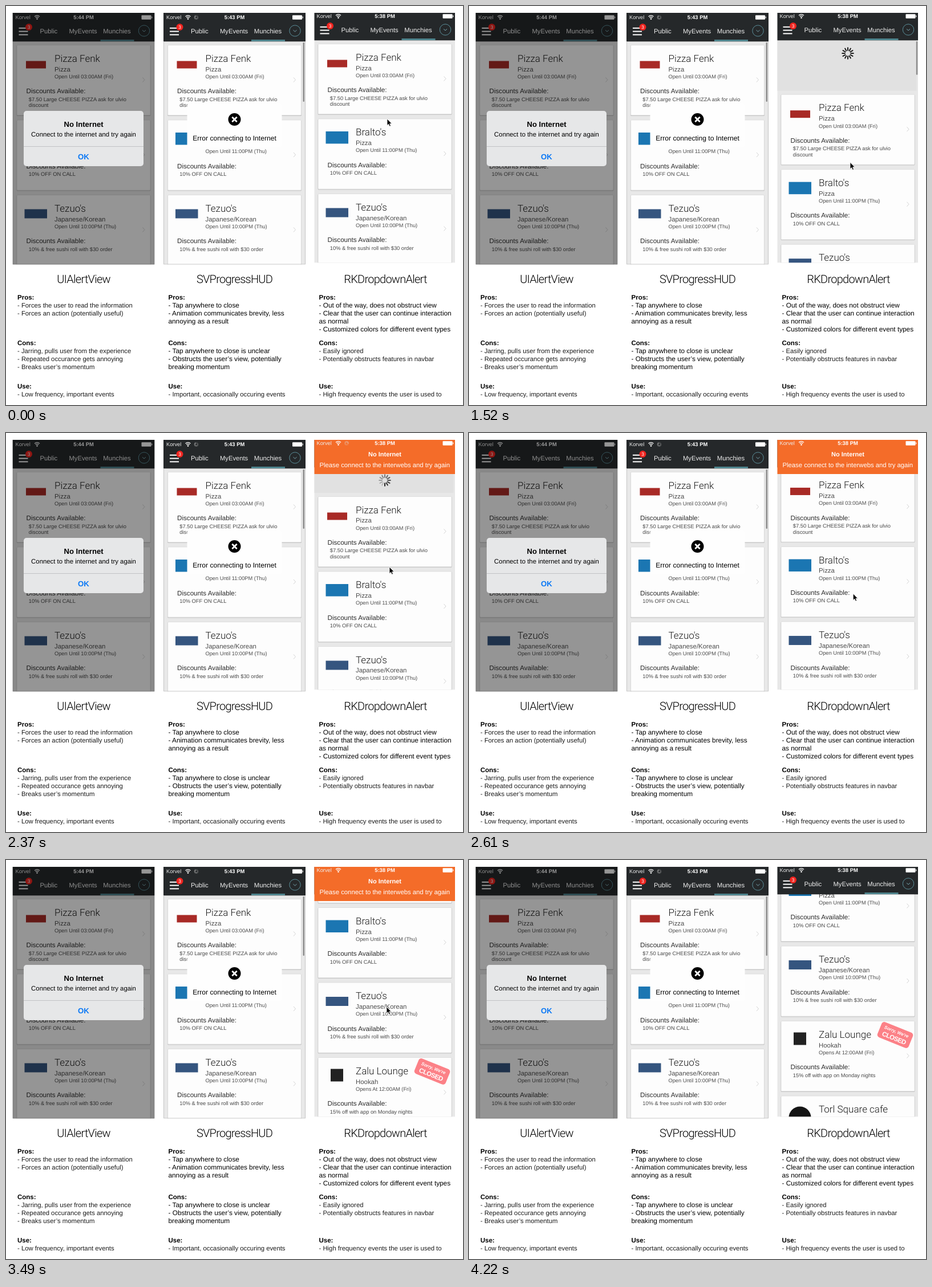
These frames come from a looping animation (801 by 700 pixels, 4580 ms). An HTML page:

```html
<!DOCTYPE html>
<html lang="en">
<head>
<meta charset="utf-8">
<title>Alert styles compared</title>
<style>
html, body { margin: 0; width: 100%; height: 100%; overflow: hidden; background: #fff; }
svg { display: block; width: 801px; height: 700px; }
text { font-family: "Liberation Sans", Arial, sans-serif; text-rendering: geometricPrecision; white-space: pre; }
.light { font-family: Roboto, "Liberation Sans", sans-serif; font-weight: 300; }
.bold { font-weight: 700; }
.mid { text-anchor: middle; }
.head { letter-spacing: -.75px; }
.tight { letter-spacing: -.6px; }
</style>
</head>
<body>
<svg id="stage" viewBox="0 0 801 700"></svg>
<script>
const LOOP = 4580, PITCH = 131.5;

const text = (x, y, size, fill, str, cls = '') =>
  `<text x="${x}" y="${y}" font-size="${size}" fill="${fill}" class="${cls}">${str}</text>`;
const rect = (x, y, w, h, fill, extra = '') =>
  `<rect x="${x}" y="${y}" width="${w}" height="${h}" fill="${fill}" ${extra}/>`;
const line = (d, stroke, w = 1) =>
  `<path d="${d}" fill="none" stroke="${stroke}" stroke-width="${w}"/>`;

const spokes = (x, y, r1, r2, w, color, id) => {
  let s = '';
  for (let i = 0; i < 12; i++)
    s += `<path d="M0 ${-r1}V${-r2}" transform="rotate(${i * 30})" opacity="${(.3 + i * .05).toFixed(2)}"/>`;
  return `<g id="${id}" transform="translate(${x} ${y})" stroke="${color}" stroke-width="${w}" stroke-linecap="round">${s}</g>`;
};

const stamp = `<g transform="translate(207.5 24.5) rotate(22)">
  ${rect(-29.5, -14.5, 59, 29, '#fc8187', 'rx="5"')}
  <g font-style="italic">${text(0, -3.5, 7.8, '#fff', "Sorry, We're", 'mid bold')}</g>
  ${text(0, 9.6, 11.4, '#fff', 'CLOSED', 'mid bold tight')}</g>`;

const cards = [
  { name: 'Pizza Fenk', kind: 'Pizza', hours: 'Open Until 03:00AM (Fri)',
    deal: ['$7.50 Large CHEESE PIZZA ask for ulvio', 'discount'],
    logo: rect(23.5, 28, 35, 13, '#a82a26') },
  { name: "Bralto's", kind: 'Pizza', hours: 'Open Until 11:00PM (Thu)',
    deal: ['10% OFF ON CALL'], logo: rect(21, 22, 39.5, 21.5, '#1b76b2') },
  { name: "Tezuo's", kind: 'Japanese/Korean', hours: 'Open Until 10:00PM (Thu)',
    deal: ['10% &amp; free sushi roll with $30 order'], logo: rect(21, 25, 39.5, 16, '#35557f') },
  { name: 'Zalu Lounge', kind: 'Hookah', hours: 'Opens At 12:00AM (Fri)',
    deal: ['15% off with app on Monday nights'], logo: rect(29.5, 20, 22, 22, '#222'), extra: stamp },
  { name: 'Torl Square cafe', kind: '', hours: '', deal: [],
    logo: '<circle cx="40.5" cy="38" r="19.5" fill="#151515"/>' }
];

const card = (c, i) => `<g transform="translate(0 ${56.5 + i * PITCH})">
  ${rect(7, .8, 235, 123.6, '#c6c6c6', 'rx="1.5"')}
  ${rect(7.5, 0, 234, 123.2, '#fdfdfd', 'rx="1.5" stroke="#d6d6d6" stroke-width=".7"')}
  ${c.logo}
  ${text(73.5, 29.2, 17, '#1a1a1a', c.name, 'light')}
  ${text(73.5, 46, 11.4, '#4c4c4c', c.kind)}
  ${text(73.5, 58.4, 9.27, '#4c4c4c', c.hours)}
  ${text(24, 84.6, 11.65, '#2c2c2c', 'Discounts Available:')}
  ${c.deal.map((d, k) => text(28.3, 98 + k * 10.8, 9.3, '#484848', d)).join('')}
  ${line('M228 57l3.5 4-3.5 4', '#d4d4d4')}
  ${c.extra || ''}</g>`;

const status = (time, busy) => `
  ${text(5, 11.2, 9.3, '#eee', 'Korvel')}
  ${line('M38.5 6.6q4.5-3.8 9 0M40.2 8.6q2.8-2.4 5.6 0', '#fff', 1.3)}
  <circle cx="43" cy="10.6" r="1.3" fill="#fff"/>
  ${busy ? spokes(57.5, 8, 2, 3.6, .8, '#ddd', busy) : ''}
  ${text(124.5, 11.3, 9.4, '#fff', time, 'mid bold')}
  ${rect(226, 4.2, 17, 7.6, '#fff', 'rx="1"')}${rect(243.6, 6.5, 1.2, 3, '#fff')}`;

const nav = `${rect(0, 50, 249, 1, '#000', 'opacity=".25"')}${rect(0, 0, 249, 50, '#25282a')}
  ${[25.8, 31.6, 37.4].map(y => rect(11, y, 16, 2, '#fff')).join('')}
  <circle cx="28.5" cy="25" r="6" fill="#f0241f"/>${text(28.5, 28, 8.3, '#fff', '3', 'mid')}
  ${text(48, 36, 11.3, '#eee', 'Public')}${text(99, 36, 11.2, '#eee', 'MyEvents')}
  ${text(158.8, 36, 11.3, '#eee', 'Munchies')}
  ${rect(154, 47, 59, 3, '#4f858e')}
  <circle cx="230.5" cy="31.5" r="9.7" fill="none" stroke="#5b8f9a"/>
  ${line('M227.5 30.3l3 2.7 3-2.7', '#79a9b3')}`;

const phone = (x, y, clip, body) => `<g transform="translate(${x} ${y})"><g clip-path="url(#${clip})">
  ${rect(0, 0, 249, 442, '#e8e8e8')}${body}</g></g>`;
const list = n => cards.slice(0, n).map(card).join('');
const edge = line('M.5 50V441H248.5V50', '#bdbdbd', .8);

const notes = [
  { x: 20, head: 'UIAlertView', mid: 136, parts: [
    ['Pros', 511, 1, 'Forces the user to read the information', 'Forces an action (potentially useful)'],
    ['Cons', 591, 1, 'Jarring, pulls user from the experience', 'Repeated occurance gets annoying', 'Breaks user’s momentum'],
    ['Use', 667, 1, 'Low frequency, important events']] },
  { x: 284.5, head: 'SVProgressHUD', mid: 400.5, parts: [
    ['Pros', 511, 0, 'Tap anywhere to close', 'Animation communicates brevity, less', '|annoying as a result'],
    ['Cons', 591, 0, 'Tap anywhere to close is unclear', 'Obstructs the user’s view, potentially', '|breaking momentum'],
    ['Use', 667, 1, 'Important, occasionally occuring events']] },
  { x: 548.5, head: 'RKDropdownAlert', mid: 665, parts: [
    ['Pros', 511, 0, 'Out of the way, does not obstruct view', 'Clear that the user can continue interaction', '|as normal', 'Customized colors for different event types'],
    ['Cons', 591, 1, 'Easily ignored', 'Potentially obstructs features in navbar'],
    ['Use', 667, 1, 'High frequency events the user is used to']] }
];

const column = c => text(c.mid, 485.5, 20, '#000', c.head, 'mid light head') +
  c.parts.map(([label, y, thin, ...rows]) =>
    text(c.x, y + 4, 11.5, '#000', label + ':', 'bold') +
    rows.map((r, i) => text(c.x, y + 18 + i * 14, thin ? 11.32 : 11.8, thin ? '#1c1c1c' : '#000',
      r[0] === '|' ? r.slice(1) : '- ' + r)).join('')).join('');

const modal = `${rect(31, 184, 210, 97, '#e6e7e8', 'rx="5"')}
  ${text(136, 211.5, 13.1, '#000', 'No Internet', 'mid bold')}
  ${text(136, 229, 11.37, '#000', 'Connect to the internet and try again', 'mid')}
  ${rect(31, 246, 210, .8, '#b9bbbd')}
  ${text(136, 268.7, 13.2, '#0a78f5', 'OK', 'mid bold')}`;

const hud = `${rect(317.5, 171, 166, 77, '#fefefe', 'rx="4"')}
  <circle cx="400.5" cy="199" r="11" fill="#000"/>
  ${line('M396.3 194.8l8.4 8.4m0-8.4l-8.4 8.4', '#fff', 2.8)}
  ${text(400.5, 236.2, 12.1, '#000', 'Error connecting to Internet', 'mid')}`;

const banner = `<g id="banner">${rect(0, 2, 249, 60, '#f46c29')}
  ${text(124.5, 31, 11, '#fff', 'No Internet', 'mid bold')}
  ${text(124.3, 50, 11.3, '#fff', 'Please connect to the interwebs and try again', 'mid')}</g>`;

const $ = id => document.getElementById(id);

$('stage').innerHTML = `<defs>
  <clipPath id="full"><rect width="249" height="441.5"/></clipPath>
  <clipPath id="crop"><rect x="1" y="2" width="246.5" height="438.3"/></clipPath></defs>
  ${phone(11.5, 12, 'full', list(3) + nav + status('5:44 PM') + edge + rect(0, 0, 249, 442, '#000', 'opacity=".41"'))}
  ${modal}
  ${phone(276, 12, 'full', list(3) + rect(244.5, 52, 2.5, 104, '#8c8c8c', 'rx="1.2"') + nav + status('5:43 PM', 'idle') + edge)}
  ${hud}
  ${phone(539.5, 10, 'crop', `<rect id="gap" y="50" width="245" height="0" fill="#e1e1e1"/>
    ${spokes(124.5, 73, 5.2, 9.8, 2, '#1c1c1c', 'wheel')}
    <g id="feed">${list(5)}</g>
    <rect id="bar" x="244.3" width="2.5" rx="1.2" fill="#8c8c8c"/>
    ${nav}${banner}${status('5:38 PM', 'busy')}`)}
  ${notes.map(column).join('')}
  <path id="cursor" d="M0 0V11.6L2.6 9.2 4.4 13.2 6.4 12.3 4.7 8.4H8.2Z" fill="#000" stroke="#fff" stroke-width=".8"/>`;

// Rows are [time, value, easing of the way to it].
const ease = {
  lin: p => p,
  out: p => 1 - (1 - p) ** 3,
  io: p => p * p * (3 - 2 * p)
};
const track = rows => t => {
  const i = rows.findIndex(r => r[0] > t);
  if (i < 0) return rows[rows.length - 1][1];
  if (!i) return rows[0][1];
  const [t0, a] = rows[i - 1], [t1, b, e = 'lin'] = rows[i];
  return a + (b - a) * ease[e]((t - t0) / (t1 - t0));
};

const curX = track([[250, 668], [760, 664.7], [950, 662.5, 'out'], [1130, 662.5], [1520, 668], [1640, 669],
  [2220, 672], [2370, 672], [2950, 675], [3360, 671], [3490, 667], [3860, 668]]);
const curY = track([[250, 198], [760, 147, 'io'], [950, 133.5, 'out'], [1130, 133.5], [1520, 274], [1640, 288, 'out'],
  [1740, 288], [2220, 235, 'io'], [2370, 235], [2740, 300, 'io'], [2780, 300], [2950, 226], [3060, 199, 'out'],
  [3300, 208, 'io'], [3490, 257], [3590, 274, 'out'], [3860, 210, 'io']]);
const scroll = track([[1130, 0], [1520, 88.5], [1640, 96, 'out'], [1720, 96], [2080, 45, 'out'], [2370, 45],
  [2640, 0, 'io'], [2780, 0], [2950, -76.5], [3060, -104], [3250, -114.5, 'out'], [3590, -114.5], [3860, -178.5, 'io']]);
const drop = track([[1760, -62], [2080, 0, 'io'], [3930, 0], [4200, -62, 'io']]);
const barFade = track([[1130, 0], [1180, 1], [1720, 1], [1980, 0], [2780, 0], [2830, 1], [3200, 1], [3400, 0],
  [3600, 0], [3650, 1], [3900, 1], [4150, 0]]);
const wheelFade = track([[2400, 1], [2600, 0]]);

const wheel = [...$('wheel').children];

function draw(t) {
  const y = scroll(t), pull = Math.max(0, y), spin = t > 1720;
  $('feed').setAttribute('transform', `translate(0 ${y})`);
  $('gap').setAttribute('height', pull);
  $('bar').setAttribute('y', 52 - Math.min(0, y) * .275);
  $('bar').setAttribute('height', 104 - pull * .51);
  $('bar').setAttribute('opacity', barFade(t));
  $('banner').setAttribute('transform', `translate(0 ${drop(t)})`);
  $('busy').setAttribute('visibility', t > 1750 && t < 2600 ? 'visible' : 'hidden');
  $('busy').setAttribute('transform', `translate(57.5 8) rotate(${Math.floor(t / 83) * 30})`);

  const turn = Math.floor((t - 1720) / 83);
  $('wheel').setAttribute('opacity', pull > 1 ? wheelFade(t) : 0);
  wheel.forEach((s, i) => s.setAttribute('opacity', spin
    ? .2 + .75 * (((i - turn) % 12 + 12) % 12) / 11
    : Math.max(0, Math.min(1, (pull - 22) / 5 - i))));

  $('cursor').setAttribute('transform', `translate(${curX(t)} ${curY(t)})`);
  $('cursor').setAttribute('visibility', t < 4120 ? 'visible' : 'hidden');
}

const start = performance.now();
function tick() {
  draw((performance.now() - start) % LOOP);
  requestAnimationFrame(tick);
}
tick();
</script>
</body>
</html>
```
